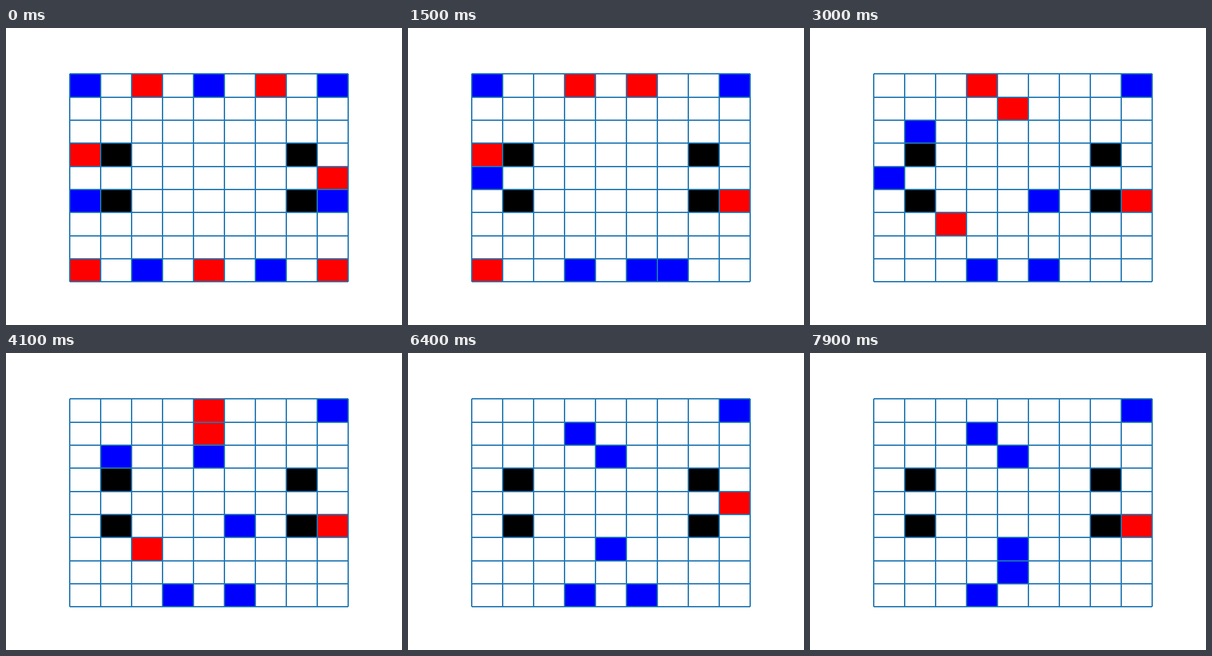
Write a matplotlib script that moves like this. It is 640 px wide and 480 px high and loops after 8000 ms.

```python
import matplotlib.pyplot as plt
from matplotlib.animation import FuncAnimation
from matplotlib.patches import Rectangle

SIZE = 9
FRAMES = 80
STEP = {"U": (0, -1), "D": (0, 1), "L": (-1, 0), "R": (1, 0)}

WALLS = [(1, 3), (7, 3), (1, 5), (7, 5)]
BLUE = [(0, 0), (4, 0), (8, 0), (0, 5), (8, 5), (2, 8), (6, 8)]
RED = [(2, 0), (6, 0), (0, 3), (8, 4), (0, 8), (4, 8), (8, 8)]

# (first turn, column, row, steps): one step every second turn.
# Blue plays the odd turns, red the even ones.
ROUTES = [
    (1, 8, 5, "D"), (3, 0, 5, "U"), (5, 8, 6, "DLLLD"), (15, 2, 8, "R"),
    (17, 0, 0, "DD"), (21, 6, 8, "UUUL"), (29, 0, 2, "RRRR"),
    (37, 0, 4, "UURRUR"), (49, 5, 5, "L"), (51, 4, 5, "DD" + "UD" * 3 + "U"),
    (69, 5, 8, "UL"), (73, 4, 6, "LRLR"),
    (2, 8, 4, "DU"), (6, 8, 8, "L"), (8, 8, 4, "D"), (10, 4, 8, "R"),
    (12, 2, 0, "R"), (14, 6, 0, "L"), (16, 8, 5, "UD"), (20, 5, 0, "LD"),
    (24, 0, 8, "UURR"), (32, 3, 0, "RL" * 3 + "R"), (46, 2, 6, "D"),
    (48, 4, 0, "D"), (50, 2, 7, "URD"), (56, 8, 5, "UUD" + "DU" * 4 + "D"),
]


def schedule():
    moves = {}
    for turn, x, y, steps in ROUTES:
        for s in steps:
            dx, dy = STEP[s]
            moves[turn] = (x, y), (x + dx, y + dy)
            x, y = x + dx, y + dy
            turn += 2
    return moves


def surrounded(board, cell):
    """A piece with two enemies beside it is taken."""
    x, y = cell
    near = [board.get((x + dx, y + dy)) for dx, dy in STEP.values()]
    return sum(c is not None and c != board[cell] for c in near) >= 2


def play():
    board = {**{c: "blue" for c in BLUE}, **{c: "red" for c in RED}}
    moves = schedule()
    states = [dict(board)]
    for turn in range(1, FRAMES):
        start, end = moves[turn]
        board[end] = board.pop(start)
        for cell in [c for c in board if surrounded(board, c)]:
            del board[cell]
        states.append(dict(board))
    return states


fig, ax = plt.subplots(figsize=(6.4, 4.8), dpi=100)
ax.axis("off")
pad = SIZE * 0.05
ax.set_xlim(-pad, SIZE + pad)
ax.set_ylim(SIZE + pad, -pad)

cells = {}
for x in range(SIZE):
    for y in range(SIZE):
        cells[x, y] = ax.add_patch(Rectangle((x, y), 1, 1, lw=0, fc="white"))
ax.vlines(range(SIZE + 1), 0, SIZE, colors="C0", lw=1.5, zorder=3)
ax.hlines(range(SIZE + 1), 0, SIZE, colors="C0", lw=1.5, zorder=3)
for wall in WALLS:
    cells.pop(wall).set_facecolor("black")

states = play()


def update(i):
    for cell, patch in cells.items():
        patch.set_facecolor(states[i].get(cell, "white"))
    return list(cells.values())


anim = FuncAnimation(fig, update, frames=FRAMES, interval=100, repeat=True,
                     repeat_delay=0)
plt.show()
```
